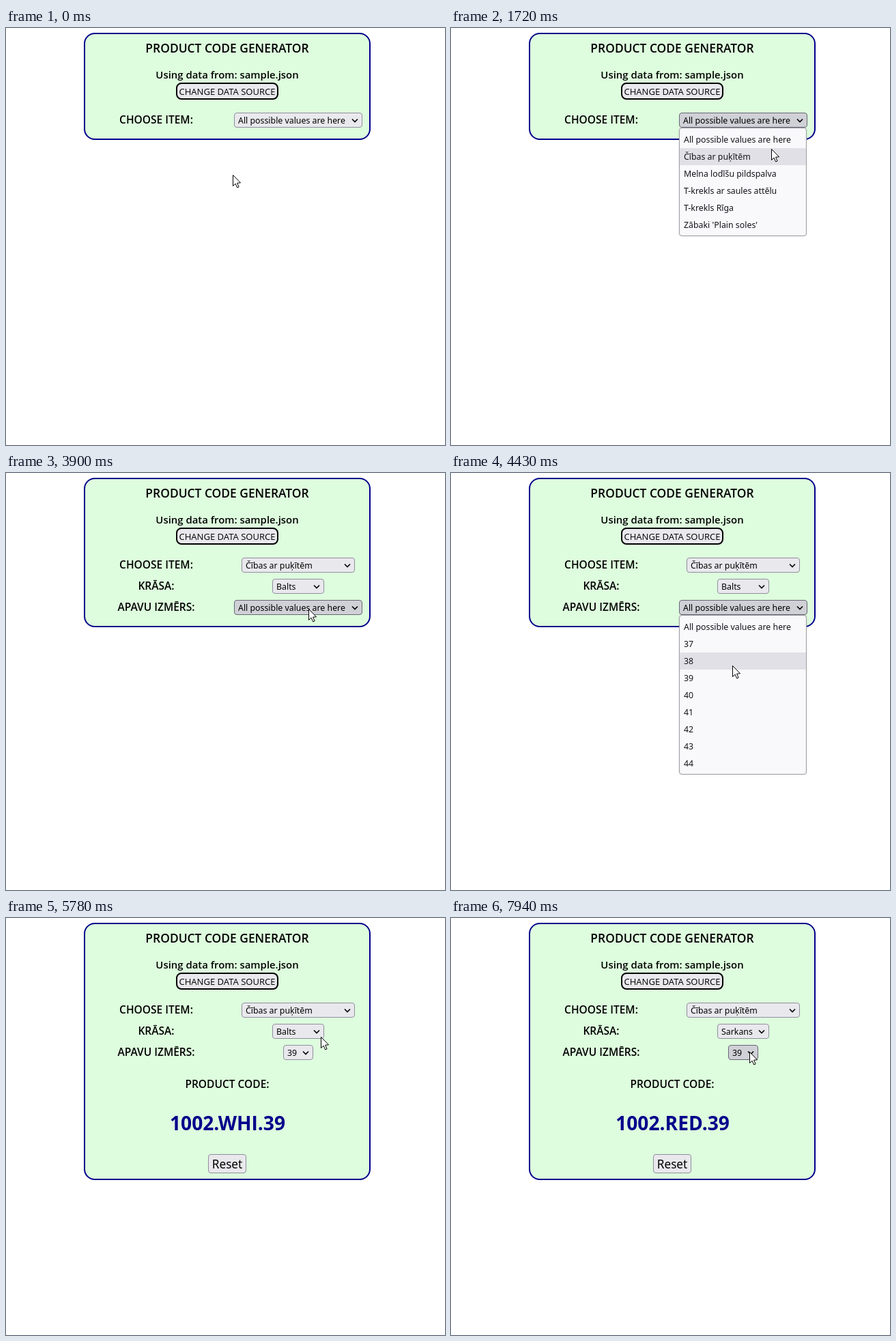
These frames come from a looping animation (643x611 px, 8000 ms). An HTML page with a canvas:

```html
<!DOCTYPE html>
<html lang="en">
<head>
<meta charset="utf-8">
<title>Product code generator</title>
<style>
html, body { margin: 0; width: 100%; height: 100%; overflow: hidden; background: #fff; }
canvas { display: block; width: 643px; height: 611px; }
</style>
</head>
<body>
<canvas id="stage" width="643" height="611"></canvas>
<script>
const ctx = document.getElementById('stage').getContext('2d');
const LOOP = 8000;
const TICK = 70;  // the pointer moves once per tick
const STEPS = 6;  // ticks per move
const ROW = 25;   // height of a menu row
const FIELD = 22; // height of a closed select
const HEAD = '"Open Sans", "Noto Sans", sans-serif';
const FORM = '"Noto Sans", "Open Sans", sans-serif';
const SMALL = '12.35px ' + FORM;
const LABEL = '600 15.5px ' + HEAD;
const NAVY = '#00008b';
const ANY = 'All possible values are here';

const fields = [
  { label: 'CHOOSE ITEM:', options: ['Čības ar puķītēm', 'Melna lodīšu pildspalva',
    'T-krekls ar saules attēlu', 'T-krekls Rīga', "Zābaki 'Plain soles'"] },
  { label: 'KRĀSA:', options: ['Balts', 'Sarkans', 'Zils'] },
  { label: 'APAVU IZMĒRS:', options: Array.from({ length: 8 }, (_, i) => String(37 + i)) }
];
const codes = { Balts: 'WHI', Sarkans: 'RED', Zils: 'BLU' };

// Clicks come in pairs: one opens a field, the next picks a value in it
const visits = [
  { field: 0, pick: 'Čības ar puķītēm' },
  { field: 1, pick: 'Balts' },
  { field: 2, pick: '39' },
  { field: 1, pick: 'Sarkans' }
];
const start = { x: 332, y: 215 };
const moves = [
  { at: 370, x: 510, y: 109 },
  { at: 770, x: 513, y: 131, click: 1110 },
  { at: 1450, x: 467, y: 179, click: 2130 },
  { at: 2340, x: 464, y: 171, click: 2730 },
  { at: 3000, x: 452, y: 224, click: 3550 },
  { at: 3690, x: 443, y: 198, click: 4160 },
  { at: 4230, x: 408, y: 294, click: 4830, hold: 0 },
  { at: 5160, x: 461, y: 174 },
  { at: 5850, x: 453, y: 164, click: 6520 },
  { at: 6860, x: 452, y: 220, click: 7460 },
  { at: 7670, x: 436, y: 195 }
];
const clicks = moves.filter(m => m.click)
  .map(({ click, hold = 2 * TICK }) => ({ down: click, act: click + hold / 2, up: click + hold }));

const easeOut = p => 1 - (1 - p) ** 3;

function pointer(t) {
  let { x, y } = start;
  for (const m of moves) {
    if (t < m.at) break;
    const step = Math.min(STEPS, Math.floor((t - m.at) / TICK) + 1);
    const p = easeOut(step / STEPS);
    x += (m.x - x) * p;
    y += (m.y - y) * p;
  }
  return { x: Math.round(x), y: Math.round(y) };
}

function formState(t) {
  const done = clicks.filter(c => t >= c.act).length;
  const values = [];
  visits.slice(0, done >> 1).forEach(v => values[v.field] = v.pick);
  return { values, open: done % 2 ? visits[done >> 1].field : -1 };
}

// A select is as wide as its longest option; the placeholder goes once a value is chosen
function layout(values) {
  ctx.font = SMALL;
  return fields.slice(0, values[0] ? 3 : 1).map(({ label, options }, i) => {
    const list = values[i] ? options : [ANY, ...options];
    const widest = Math.max(...list.map(s => ctx.measureText(s).width));
    const w = 2 * Math.round((widest + 30.5) / 2);
    return { label, list, value: values[i] || ANY, x: 428 - w / 2, y: 124 + 31 * i, w };
  });
}

function text(str, x, y, font, color = '#000', align = 'center') {
  ctx.font = font;
  ctx.fillStyle = color;
  ctx.textAlign = align;
  ctx.fillText(str, x, y);
}

function box(x, y, w, h, r, fill, stroke, line = 1) {
  ctx.beginPath();
  ctx.roundRect(x + line / 2, y + line / 2, w - line, h - line, r);
  ctx.fillStyle = fill;
  ctx.fill();
  ctx.strokeStyle = stroke;
  ctx.lineWidth = line;
  ctx.stroke();
}

function strokeLine(points, width) {
  ctx.beginPath();
  points.forEach(([x, y]) => ctx.lineTo(x, y));
  ctx.strokeStyle = '#000';
  ctx.lineWidth = width;
  ctx.stroke();
}

function drawSelect({ x, y, w, value }, state) {
  const fill = ['#e9e9ed', '#d0d0d7', '#b1b1b9'][state];
  const edge = ['#8f8f9d', '#676774', '#484851'][state];
  box(x, y, w, FIELD, 3.5, fill, edge);
  text(value, x + 6, y + 16, SMALL, '#000', 'left');
  const cx = x + w - 11, cy = y + 9.5;
  strokeLine([[cx - 4, cy], [cx, cy + 4], [cx + 4, cy]], 1.6);
}

function drawMenu({ x, y, w, list }, at) {
  const top = y + FIELD, h = list.length * ROW + 9;
  ctx.save();
  ctx.shadowColor = 'rgba(0,0,0,.1)';
  ctx.shadowBlur = 3;
  box(x, top, w - 1, h, 3.5, '#f9f9fb', '#a0a0a8');
  ctx.restore();
  const active = Math.floor((at.y - top - 5) / ROW);
  list.forEach((option, i) => {
    const rowY = top + 5 + i * ROW;
    if (i === active) {
      ctx.fillStyle = '#e0e0e6';
      ctx.fillRect(x + 1, rowY, w - 3, ROW);
    }
    text(option, x + 7, rowY + 17, SMALL, '#15141a', 'left');
  });
}

function drawPointer({ x, y }) {
  ctx.save();
  ctx.translate(x + .5, y + .5);
  const arrow = new Path2D('M0 0V16L3.6 12.6 6.2 18.4 8.6 17.4 6.1 11.7 11 11.3Z');
  ctx.fillStyle = '#fff';
  ctx.fill(arrow);
  ctx.strokeStyle = '#000';
  ctx.lineWidth = 1;
  ctx.stroke(arrow);
  ctx.restore();
}

function drawCard(rows, [, colour, size]) {
  const height = 126 + 31 * rows.length + (size ? 158 : 0);
  box(114, 7, 420, height, 15, '#defcde', NAVY, 2);
  text('PRODUCT CODE GENERATOR', 324, 36, '600 17.4px ' + HEAD);
  text('Using data from: sample.json', 324, 74, '600 14.9px ' + HEAD);
  box(249, 80, 150, 25, 7, '#e9e9ed', '#000', 2);
  text('CHANGE DATA SOURCE', 324, 98, '13.05px ' + HEAD);
  rows.forEach(r => text(r.label, 220, r.y + 16, LABEL));
  if (size) {
    text('PRODUCT CODE:', 324, 249, LABEL);
    text(`1002.${codes[colour]}.${size}`, 324.5, 311, '700 28.2px ' + HEAD, NAVY);
    box(296, 346, 56, 28, 3.5, '#e9e9ed', '#8f8f9d');
    text('Reset', 324, 367, '17.2px ' + FORM);
  }
}

function draw(t) {
  ctx.fillStyle = '#fff';
  ctx.fillRect(0, 0, 643, 611);
  const { values, open } = formState(t);
  const rows = layout(values);
  drawCard(rows, values);

  const at = pointer(t);
  const seen = pointer(t - TICK); // hover styling trails by one tick
  const pressed = clicks.some(c => t >= c.down && t < c.up);
  rows.forEach((r, i) => {
    const over = Math.abs(seen.x - r.x - r.w / 2) < r.w / 2 - 4
      && Math.abs(seen.y - r.y - FIELD / 2) < FIELD / 2 - 4;
    const hover = open < 0 ? over : open === i;
    drawSelect(r, hover ? (pressed && over ? 2 : 1) : 0);
  });
  if (open >= 0) drawMenu(rows[open], at);

  if (pressed) {
    ctx.beginPath();
    ctx.arc(at.x, at.y, 12, 0, Math.PI * 2);
    ctx.fillStyle = 'rgba(255,225,0,.55)';
    ctx.fill();
  }
  drawPointer(at);
}

const began = performance.now();
function frame() {
  draw((performance.now() - began) % LOOP);
  requestAnimationFrame(frame);
}
frame();
</script>
</body>
</html>
```
